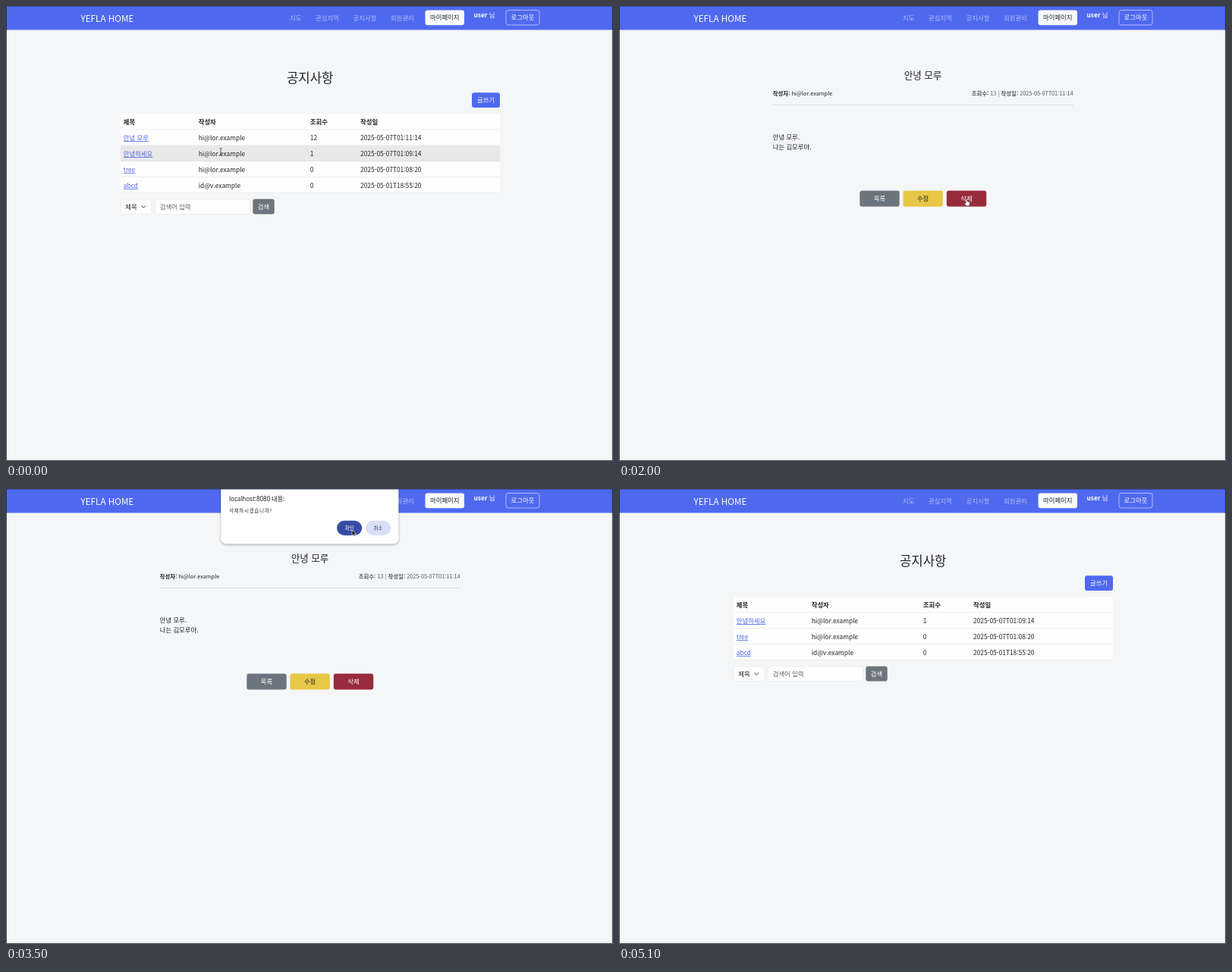
An HTML page that plays this animation: 800x600 px, repeating every 5200 ms.

```html
<!DOCTYPE html>
<html lang="ko">
<head>
<meta charset="utf-8">
<style>
  html, body { margin: 0; width: 100%; height: 100%; overflow: hidden; background: #f5f6f7; }
  svg { display: block; }
  text { font: 400 8.37px "Noto Sans CJK KR", "Noto Sans KR", "Noto Sans CJK", "Noto Sans", sans-serif; white-space: pre; }
</style>
</head>
<body>
<svg id="stage" width="800" height="600" viewBox="0 0 800 600"></svg>
<script>
const LOOP = 5200, STEP = 100;
const BLUE = '#4f69ee', INK = '#212529', GRAY = '#6c757d', LINE = '#e3e5e8';
const LIST_BACK = 3600, OPEN_POST = 1100, DIALOG_OPEN = 2250;
const ROW_TOP = 163.2, ROW_H = 20.9;

const posts = [
  ['안녕 모루', 'hi@lor.example', 12, '2025-05-07T01:11:14'],
  ['안녕하세요', 'hi@lor.example', 1, '2025-05-07T01:09:14'],
  ['tree', 'hi@lor.example', 0, '2025-05-07T01:08:20'],
  ['abcd', 'id@v.example', 0, '2025-05-01T18:55:20'],
];
const columns = [154.8, 253.7, 400.8, 467];

// Pointer path: time, x, y
const path = [
  [0, 283, 192], [700, 174, 174], [1000, 174, 174], [1200, 296, 248], [1400, 319, 248],
  [1800, 427, 252], [2000, 458, 254], [2300, 458, 254], [2400, 458, 234], [3000, 456, 54],
  [3800, 456, 54], [4300, 421, 178], [4400, 421, 178], [4900, 432, -14], [LOOP, 432, -14],
];

const rect = (x, y, w, h, r, fill, extra = '') =>
  `<rect x="${x}" y="${y}" width="${w}" height="${h}" rx="${r}" fill="${fill}" ${extra}/>`;
const text = (s, x, y, fill = INK, style = '', anchor = 'start') =>
  `<text x="${x}" y="${y}" fill="${fill}" text-anchor="${anchor}" style="${style}">${s}</text>`;
const button = (label, x, y, w, h, fill, ink = '#fff', extra = '') =>
  rect(x, y, w, h, 3, fill, extra) +
  text(label, x + w / 2, y + h / 2 + 3.1, ink, 'font-weight:500', 'middle');
const inside = (p, x, y, w, h) => p.x >= x && p.x < x + w && p.y >= y && p.y < y + h;

function pointerAt(t) {
  const i = path.findIndex(k => k[0] > t);
  const [t0, x0, y0] = path[i - 1], [t1, x1, y1] = path[i];
  const u = (t - t0) / (t1 - t0), e = u * u * (3 - 2 * u);
  return { x: x0 + (x1 - x0) * e, y: y0 + (y1 - y0) * e };
}

function navbar() {
  const links = [['지도', 374], ['관심지역', 408], ['공지사항', 457.6], ['회원관리', 507]];
  return rect(0, 0, 800, 31.5, 0, BLUE) +
    text('YEFLA HOME', 98.5, 20.8, '#fff', 'font-size:11.7px') +
    links.map(([s, x]) => text(s, x, 19, '#b0bcf7')).join('') +
    button('마이페이지', 552.5, 5.5, 51.5, 19.7, '#f8f9fa', INK) +
    text('<tspan font-weight="700">user</tspan> 님', 644.5, 15.2, '#fff', '', 'end') +
    button('로그아웃', 659, 5.5, 44, 19.5, 'none', '#fff', 'stroke="#d5dcfb" stroke-width=".7"');
}

function listPage(rows, p) {
  const bottom = ROW_TOP + rows.length * ROW_H;
  const overTable = inside(p, 151, ROW_TOP, 500, bottom - ROW_TOP);
  const hovered = overTable ? Math.floor((p.y - ROW_TOP) / ROW_H) : -1;
  let out = text('공지사항', 400.7, 100.7, INK, 'font-size:16.7px;font-weight:500', 'middle') +
    button('글쓰기', 614, 114.3, 37, 19.7, BLUE) +
    rect(151, 142.2, 500, bottom - 142.2, 0, '#fdfdfd') +
    ['제목', '작성자', '조회수', '작성일'].map((s, i) =>
      text(s, columns[i], 156.1, INK, 'font-weight:700')).join('') +
    rect(151, ROW_TOP - .5, 500, .6, 0, LINE);
  rows.forEach((row, r) => {
    const y = ROW_TOP + r * ROW_H;
    if (r === hovered) out += rect(151, y, 500, ROW_H, 0, '#e8e8e9');
    out += rect(151, y + ROW_H - .5, 500, .6, 0, '#dfe1e4');
    out += row.map((s, i) => text(s, columns[i], y + 13.9, i ? INK : BLUE,
      i ? '' : 'text-decoration:underline')).join('');
  });
  const y = bottom + 8, edge = `stroke="${LINE}" stroke-width=".6"`;
  return out + rect(151.2, y, 40.6, 19.6, 3, '#fdfdfd', edge) + text('제목', 157.2, y + 12.9) +
    `<path d="M178.6 ${y + 8.6}l2.7 2.7 2.7-2.7" fill="none" stroke="#343a40"/>` +
    rect(196.2, y, 125.6, 19.6, 3, '#fdfdfd', edge) + text('검색어 입력', 202.7, y + 12.9, '#5c6268') +
    button('검색', 325.3, y - .2, 28.4, 19.8, GRAY);
}

function postPage(p, dialogOpen) {
  const [title, author, views, date] = posts[0];
  const small = 'font-size:7.32px', bold = s => `<tspan font-weight="700">${s}</tspan>`;
  const over = x => !dialogOpen && inside(p, x, 243.5, 52.4, 21);
  return text(title, 400.5, 96.4, INK, 'font-size:12.55px;font-weight:500', 'middle') +
    text(`${bold('작성자:')} ${author}`, 202.8, 117.8, INK, small) +
    text(`${bold('조회수:')} ${views + 1} | ${bold('작성일:')} ${date}`, 598.5, 117.8, '#565b60', small, 'end') +
    rect(202.5, 130.2, 396, .8, 0, '#cfd2d4') +
    text('안녕 모루.', 202.7, 176) + text('나는 김모루야.', 202.7, 189.2) +
    button('목록', 317.3, 243.4, 52.4, 21, over(317.3) ? '#5c636a' : GRAY) +
    button('수정', 374.4, 243.4, 52.4, 21, over(374.4) ? '#e9cd5c' : '#e6c746', INK) +
    button('삭제', 431.8, 243.4, 52.4, 21, dialogOpen || over(431.8) ? '#982b3c' : '#b23445');
}

function dialog(t, p) {
  const u = Math.min(1, (t - DIALOG_OPEN) / 135);
  const ring = inside(p, 436, 42, 33, 19) ? '' :
    rect(434.3, 40, 36.6, 23, 11.5, 'none', 'stroke="#3b4da8" stroke-width="1"');
  const tiny = 'font-size:6.5px';
  return `<g opacity="${u}" transform="translate(0 ${-8 * (1 - u)})"
      style="filter:drop-shadow(0 1px 1.5px rgba(0,0,0,.35))">` +
    rect(283.2, -20, 234.2, 92.5, 7, '#fefefe') + '</g>' +
    `<g opacity="${u}" transform="translate(0 ${-8 * (1 - u)})">` +
    text('localhost:8080 내용:', 294, 15.8, '#202124', 'font-size:8px;font-family:\'Noto Sans\',\'Noto Sans CJK KR\',sans-serif') +
    text('삭제하시겠습니까?', 294, 30.8, '#34373b', 'font-size:6.6px;letter-spacing:.6px') + ring +
    rect(436, 41.8, 33.2, 19.4, 9.7, '#3a4ba6') + text('확인', 452.7, 54, '#fff', tiny, 'middle') +
    rect(474, 41.8, 33, 19.4, 9.7, '#d9e0f7') + text('취소', 490.5, 54, '#3a4470', tiny, 'middle') + '</g>';
}

const shapes = {
  arrow: '<path d="M0 0V7.6L1.8 6 3 8.6 4.2 8 3.1 5.5H5.4Z" fill="#fff" stroke="#333" stroke-width=".7"/>',
  darkArrow: '<path d="M0 0V7.6L1.8 6 3 8.6 4.2 8 3.1 5.5H5.4Z" fill="#111" stroke="#fff" stroke-width=".6"/>',
  hand: '<path d="M-.9.8Q0-.6.9.8V3.6L4 4.5Q4.7 4.8 4.5 6L3.7 9.6H-.7L-2.7 6.4Q-2.6 5.3-.9 6.2Z" fill="#fff" stroke="#333" stroke-width=".6"/>',
  beam: '<path d="M-1.8-4.6Q0-4.6 0-3.4Q0-4.6 1.8-4.6M0-3.4V3.4M-1.8 4.6Q0 4.6 0 3.4Q0 4.6 1.8 4.6" fill="none" stroke="#444" stroke-width=".8"/>',
};

function pointer(t, p, onList, dialogOpen) {
  let kind = 'arrow';
  if (dialogOpen) kind = t < 2500 ? 'hand' : 'darkArrow';
  else if (onList && inside(p, 254, 167, 61, 76)) kind = 'beam';
  else if (onList && inside(p, 154, 167, 38, 34)) kind = 'hand';
  else if (!onList && [317.3, 374.4, 431.8].some(x => inside(p, x, 243.4, 52.4, 21))) kind = 'hand';
  return `<g transform="translate(${p.x} ${p.y})">${shapes[kind]}</g>`;
}

function scene(t) {
  const p = pointerAt(t);
  const onList = t < OPEN_POST || t >= LIST_BACK;
  const dialogOpen = t > DIALOG_OPEN && t < LIST_BACK;
  return rect(0, 0, 800, 600, 0, '#f5f6f7') + navbar() +
    (onList ? listPage(t < OPEN_POST ? posts : posts.slice(1), p) : postPage(p, dialogOpen)) +
    (dialogOpen ? dialog(t, p) : '') +
    '<path d="M.4 0V599.4H799.4V0" fill="none" stroke="#1c1d20" stroke-width=".9"/>' +
    rect(0, 0, 800, .5, 0, '#26305f') +
    pointer(t, p, onList, dialogOpen);
}

const stage = document.getElementById('stage');
let start, shown = -1;
function tick(now) {
  start ??= now;
  const t = Math.floor((now - start) % LOOP / STEP) * STEP;
  if (t !== shown) stage.innerHTML = scene(shown = t);
  requestAnimationFrame(tick);
}
requestAnimationFrame(tick);
</script>
</body>
</html>
```
